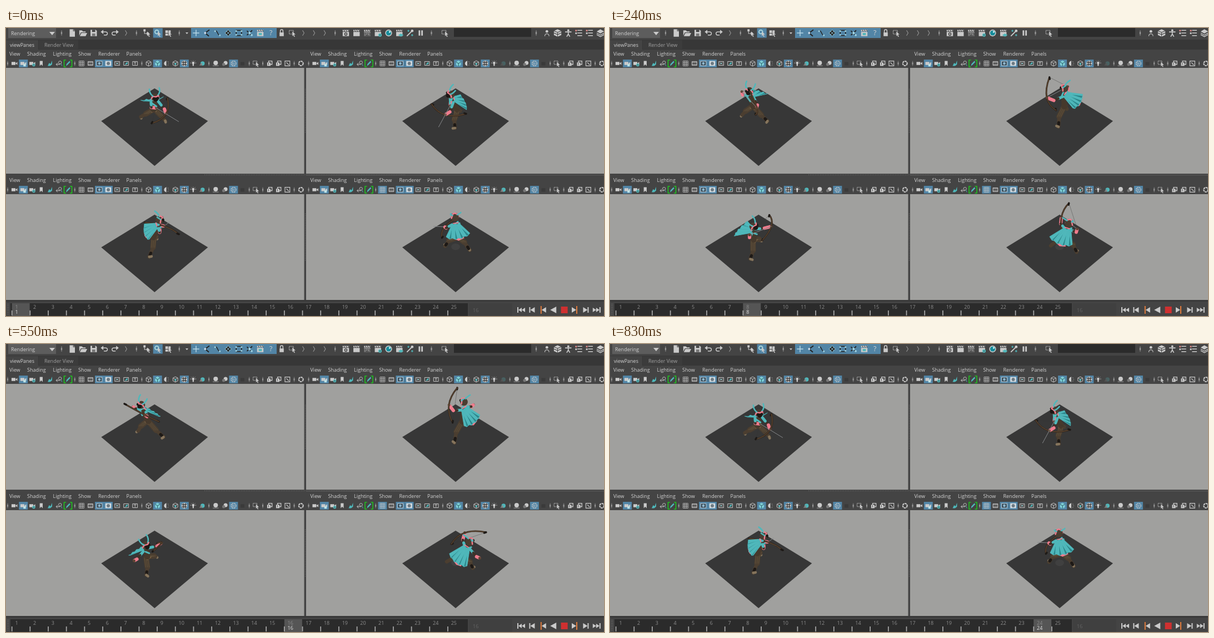
Animation of 1076x520 px, one loop 0.87 s. Source, as an HTML page with a canvas:

```html
<!DOCTYPE html>
<html lang="en">
<head>
<meta charset="utf-8">
<title>Archer viewports</title>
<style>
html, body { margin: 0; width: 100%; height: 100%; overflow: hidden; background: #444; }
svg, canvas { position: absolute; left: 0; top: 0; width: 1076px; height: 520px; display: block; }
text { font: 9px "Open Sans", "Noto Sans", sans-serif; fill: #d2d2d2; }
.dim { fill: #8c8c8c; }
</style>
</head>
<body>
<svg id="ui" viewBox="0 0 1076 520"></svg>
<canvas id="stage" width="1076" height="520"></canvas>
<script>
const LIGHT = '#cacaca', TEAL = '#4fb8bb', BLUE = '#5285a6', BAR = '#444', DARK = '#2b2b2b';

// ---------- interface ----------
const rect = (x, y, w, h, c, more = '') => `<rect x="${x}" y="${y}" width="${w}" height="${h}" fill="${c}" ${more}/>`;
const fill = (d, c = LIGHT) => `<path d="${d}" fill="${c}"/>`;
const line = (d, c = LIGHT, w = 1.1, more = '') => `<path d="${d}" fill="none" stroke="${c}" stroke-width="${w}" ${more}/>`;
const disc = (x, y, r, c = LIGHT) => `<circle cx="${x}" cy="${y}" r="${r}" fill="${c}"/>`;
const ring = (r, w, dash) => `<circle r="${r}" fill="none" stroke="${LIGHT}" stroke-width="${w}" stroke-dasharray="${dash}"/>`;
const label = (x, y, s, more = '') => `<text x="${x}" y="${y}" ${more}>${s}</text>`;
const at = (x, y, s, k = 1) => `<g transform="translate(${x} ${y}) scale(${k})">${s}</g>`;
const flip = s => `<g transform="scale(-1 1)">${s}</g>`;
const dots = d => line(d, '#777', 1, 'stroke-dasharray="1 2"');

const frame = line('M-5-4H5V4H-5Z');
const cam = fill('M-6-3H2V3H-6ZM2 0L6-3V3Z');
const cursor = fill('M0-3L6 3L3 3L5 7L3 7L2 4L0 6Z');
const clap = rect(-6, -2, 12, 8, LIGHT) + fill('M-6-6H6V-3H-6Z') + line('M-4-6L-2-3M0-6L2-3M4-6L6-3', BAR);
const box = line('M0-5.5L5-3V3L0 5.5L-5 3V-3ZM-5-3L0-.5L5-3M0-.5V5.5');
const undo = line('M-4-2H2C7-2 7 4 2 4H-1', LIGHT, 1.6) + fill('M-7-2L-2-6V2Z');
const list = line('M-3-5H6M-3 0H6M-3 5H6', LIGHT, 1.8) + rect(-7, -6, 3, 3, '#d88') + rect(-7, -1, 3, 3, LIGHT);

const icons = {
  sep: rect(-.8, -5, 1.6, 10, '#777') + rect(-1.2, -2, 2.4, 4, '#999'),
  cam, camLock: cam + fill('M0 1H5V6H0Z', '#bfe3e6'), camGear: cam + disc(3, 3, 3, TEAL) + disc(3, 3, 1, BAR),
  mark: fill('M-3-5H3V5L0 2L-3 5Z'),
  pan: fill('M-5 5L-2-1L1 1L4-6V2L0 5Z', TEAL),
  zoom: line('M-6 2H2M-3-1L-6 2L-3 5') + at(2, -2, ring(3, 1, 'none')) + line('M4 1L6 5', TEAL),
  pencil: line('M-4-7H-8V7H-4M4-7H8V7H4', '#18d818', 1.5) + fill('M-4 5L-3 1L3-5L5-3L-1 3Z', TEAL),
  grid: line('M-5-5H5V5H-5ZM-5-1.7H5M-5 1.7H5M-1.7-5V5M1.7-5V5', LIGHT, .9),
  film: frame + line('M-5-2H5M-5 2H5'),
  gate: rect(-6, -5, 12, 10, '#d5dde2') + rect(-5, -4, 10, 8, '#2d4250') + disc(0, 0, 2.8, '#8fb4c8'),
  mask: rect(-6, -5, 12, 10, '#d5dde2') + disc(0, 0, 3.4, '#6d7a82'),
  cross: frame + line('M-3-2L3 2M3-2L-3 2') + disc(0, 0, 1, TEAL),
  safe: frame + fill('M-3 3L0-1L3-3V1Z', TEAL),
  title: frame + line('M-2.5-2H2.5M0-2V3'),
  box, texBox: box + disc(0, 1, 2, TEAL),
  solidBox: fill('M0-6L5-3V3L0 6L-5 3V-3Z', '#7fd0d6') + line('M-5-3L0 0L5-3M0 0V6', '#24515e'),
  half: disc(0, 0, 5) + fill('M0-5A5 5 0 0 1 0 5Z', '#222') + line('M1-3H4M1 0H5M1 3H4', LIGHT, .8),
  check: disc(0, 0, 6) + line('M-5-2H5M-5 2H5M-2-5V5M2-5V5', '#333', 1.4),
  bulb: disc(0, -1, 2.6) + rect(-1.3, 1, 2.6, 4, LIGHT) + line('M-6-1H-4M4-1H6M0-6V-5M-4-5L-3-4M4-5L3-4'),
  orb: disc(1, 0, 4.2, TEAL) + fill('M-6 4L0-2V4Z', '#888'),
  ball: disc(0, -1, 4.6) + fill('M-6 4H6V5.5H-6Z', '#888'),
  blur: disc(2, -1, 4) + disc(-2, 2, 3, '#777'),
  smooth: ring(5, 1.4, '3 1') + line('M-2-3V3M1-2V3'),
  dimBox: rect(-4, -3, 8, 7, '#3a3a3a'),
  pick: line('M-6-5H2V2H-6Z', LIGHT, 1, 'stroke-dasharray="2 1"') + cursor,
  copy: line('M-2-5H5V2H-2Z', LIGHT, 1.5) + fill('M-5-2H2V5H-5Z') + line('M-2-1V3', BAR),
  shrink: line('M-5-5H5V5H-5ZM-2-2L3 3', LIGHT, 1.3), iris: ring(4.5, 2.4, '4 1'),
  next: line('M-1-5L2 0L-1 5', '#999'),
  file: fill('M-5-7H2L5-4V7H-5Z') + line('M2-7V-4H5', BAR),
  folder: fill('M-7-5H-2L0-3H5V-1H-4L-7 5ZM-3 0H8L5 6H-6Z'),
  save: fill('M-6-6H4L6-4V6H-6Z') + rect(-3, -6, 6, 4, BAR) + rect(-3, 1, 6, 5, '#777'),
  undo, redo: flip(undo),
  tree: fill('M-7-7H-3V-3H-7ZM-1-1H3V3H-1Z') + line('M-5-3V1H-1') + cursor,
  aim: rect(-9, -9, 18, 18, BLUE) + disc(-2, -2, 4.5, '#a8d5dc') + disc(-2, -2, 2.5, BLUE) + cursor,
  hit: fill('M-6-5H-1V0H-6ZM0-5H4V0H0ZM-6 1H-1V5H-6Z') + cursor,
  plus: line('M-6 0H6M0-6V6', '#b8d8e6', 1.5), bend: line('M5-6L-3 0L4 6', '#222', 2) + disc(-3, 0, 2, '#cde'),
  curve: line('M-6-4C2-6-2 4 6 5', '#222', 1.5) + rect(-6, -5, 3, 3, '#9ed2e2') + rect(3, 3, 3, 3, '#9ed2e2'),
  gem: fill('M0-6L6 0L0 6L-6 0Z', '#222') + line('M0-6L6 0L0 6L-6 0ZM-3-3L3 3M3-3L-3 3', '#9ed2e2', 1),
  lattice: line('M-5-5H5V5H-5Z', '#222', 1.6) + line('M-5-5V5M5-5V5', '#9ed2e2', 3, 'stroke-dasharray="3 4"'),
  links: line('M-5-4L4 5M5-5L-5 4', '#222', 1.8) + disc(0, 0, 2.4, '#9ed2e2') + disc(4, 4, 2, '#9ed2e2'),
  clap, clapTeal: clap + rect(-3, 0, 6, 4, TEAL), help: label(-2.8, 4.5, '?', 'style="font-size:13px"'),
  lock: rect(-4, -1, 8, 7, LIGHT) + line('M-2.5-1V-4A2.5 2.5 0 0 1 2.5-4V-1', LIGHT, 1.6),
  eye: clap + disc(0, 2, 3, BAR) + disc(0, 2, 1.4), gear: clap + disc(4, 4, 3.2, TEAL) + disc(4, 4, 1, BAR),
  ipr: clap + rect(-6, -1, 12, 7, BAR) + label(-5.5, 5.5, 'IPR', 'style="font-size:7px"'),
  lens: disc(0, 0, 6.5) + disc(0, 0, 4.8, '#168c9b') + disc(2, -2, 1.6, '#dff'),
  stack: clap + fill('M-2 4L3 1L8 4L3 7Z', TEAL),
  spark: line('M-6 6L3-3', LIGHT, 2) + line('M-5-4L-1-4M-3-6V-2M4 2V6M2 4H6', TEAL, 1.4) + disc(4, -4, 2.5),
  pause: rect(-4, -5, 3, 10, LIGHT) + rect(1, -5, 3, 10, LIGHT),
  user: disc(0, -3, 2.6) + line('M-4 6C-4 0 4 0 4 6'),
  cube: fill('M0-7L7-4V4L0 7L-7 4V-4Z') + line('M-7-4L0-1L7-4M0-1V7M-7 0L0 3L7 0', BAR),
  man: disc(0, -5, 2) + line('M-6-2H6M0-3V2L-3 7M0 2L3 7', LIGHT, 1.8),
  list, tiers: fill('M0-7L7-3L0 1L-7-3Z') + line('M-7 0L0 4L7 0M-7 3L0 7L7 3', LIGHT, 1.5)
};

const panelNames = ('sep cam camLock camGear mark pan zoom pencil sep grid film gate mask cross safe title sep ' +
  'box solidBox half texBox check bulb orb sep ball blur smooth dimBox sep pick sep copy copy shrink sep iris').split(' ');
const menus = { View: 6, Shading: 38, Lighting: 84.5, Show: 130, Renderer: 166, Panels: 216.5 };

function iconRow(active) {
  let x = 3;
  return panelNames.map((n, i) => {
    if (i) x += n === 'sep' || panelNames[i - 1] === 'sep' ? 12.2 : 16.05;
    return (active.includes(n) ? rect(x - 8, 57, 16, 14, BLUE) : '') + at(x, 64, icons[n], .88);
  }).join('');
}
function panel(i) {
  const active = ['camLock', 'gate', 'mask', 'solidBox', 'check', 'smooth'].concat(i === 3 ? 'grid' : []);
  const left = i % 2 ? -1.5 : 0;
  return at(i % 2 * 541.5, i > 1 ? 228 : 0,
    rect(left, 72, 536.5, 191, '#a0a09e') + iconRow(active) +
    Object.entries(menus).map(([s, x]) => label(x, 50, s)).join('') +
    (i === 1 ? rect(346, 58, 15, 12, BAR, 'opacity=".75"') : ''));
}
const toolbar = (x, names) => names.split(' ').map((n, i) => at(x + 19.25 * i, 9, icons[n], .95)).join('');

const slot = n => 10.6 + 32.68 * (n - 1);
const numbers = Array.from({ length: 25 }, (_, i) => i + 1);
const first = fill('M-7-5H-5V5H-7ZM-5 0L1-4V4ZM1 0L7-4V4Z'), prev = fill('M-5-5H-3V5H-5ZM-3 0L5-5V5Z');
const keyBack = rect(-4, -7, 2, 14, '#df7b3c') + fill('M-2 0L6-5V5Z'), play = fill('M-6 0L5-6V6Z');
const controls = [first, prev, keyBack, play, rect(-6, -6, 12, 12, '#cf3030'), flip(keyBack), flip(prev), flip(first)];

document.getElementById('ui').innerHTML =
  rect(0, 0, 1076, 520, BAR) + rect(4, 0, 86, 18, '#5d5d5d') + label(9, 13, 'Rendering') + fill('M78 7H88L83 13Z') +
  rect(333, 0, 154, 18, BLUE) + rect(806, 0, 139, 16, DARK) + fill('M323 8H328L325.5 11Z') +
  toolbar(100, 'sep file folder save undo redo next sep tree aim hit sep') +
  toolbar(342, 'plus bend curve gem lattice links clapTeal help lock pick next next next sep eye clap ipr gear lens stack spark pause sep') +
  toolbar(790, 'pick') + toolbar(954, 'sep user cube man list list tiers') +
  rect(0, 21, 1076, 18, '#373737') + rect(0, 22, 58, 17, BAR) + rect(59, 22, 71, 16, '#3c3c3c') +
  label(7, 34, 'viewPanes') + label(69, 34, 'Render View', 'style="fill:#a0a0a0"') +
  [0, 1, 2, 3].map(panel).join('') +
  rect(540, 265, 536, 1, '#5a5a5a') + dots('M357 265H719M538.5 110V190M538.5 335V420') +
  rect(0, 491, 1076, 3, '#393939') + rect(8, 497, 823, 23, DARK) + dots('M2.5 498V518M4.5 498V518') +
  rect(0, 497, 32, 23, '#555', 'id="mark"') +
  numbers.map(n => label(slot(n) + 5.8, 507, n, 'class="dim"') + rect(slot(n) - .8, 510, 1.7, 9, '#aaa')).join('') +
  label(0, 516, '', 'id="now" style="fill:#e2e2e2"') +
  rect(833, 497, 78, 23, '#404040') + label(840, 513, '16', 'style="fill:#626262"') +
  controls.map((c, i) => at(927 + 19.4 * i, 509, c)).join('');

// ---------- key poses: points are [across, height, depth] on the floor ----------
const ready = { at: 0, count: 1, hip: [-2, 25, -2], head: [1, 62, 8], grip: [19, 34, 17], nock: [3, 40, 9],
  axis: [.42, .05, -.9], hem: [-5, 38, -17], stride: [0] };
const raise = { at: 3, count: 3, hip: [-1, 27, -4], head: [-1, 64, 5], grip: [14, 54, 20], nock: [4, 54, 8],
  axis: [-.77, .36, .5], hem: [-16, 40, -22], stride: [0] };
const draw = { at: 7, count: 8, hip: [-9, 26, -8], head: [-15, 62, -8], grip: [-3, 52, 21], nock: [-28, 56, -14],
  axis: [-.15, .95, .15], hem: [0, 42, -34], stride: [1] };
const loose = { at: 16, count: 16, hip: [-11, 26, -12], head: [-22, 62, -14], grip: [-15, 61, 11], nock: [-38, 44, -32],
  axis: [-.85, .48, -.12], hem: [-1, 33, -31], stride: [1] };
const recover = { at: 20, count: 22, hip: [-4, 23, -5], head: [-7, 57, 6], grip: [9, 29, 20], nock: [0, 35, 9],
  axis: [.98, -.09, -.13], hem: [-3, 35, -21], stride: [1] };
const poses = [ready, raise, draw, { ...draw, at: 11, count: 12 }, loose, recover, { ...ready, at: 24, count: 24 }];

// ---------- vectors and camera ----------
const mix = (a, b, u) => a.map((n, i) => n + (b[i] - n) * u);
const add = (a, b, k = 1) => a.map((n, i) => n + b[i] * k);
const unit = a => a.map(n => n / (Math.hypot(...a) || 1));
const lift = (a, h) => add(a, [0, h, 0]);

// Four cameras circle the floor at 45 degrees, with a mild perspective.
function camera(x0, y0, turn) {
  const c = Math.cos(turn), s = Math.sin(turn);
  return ([x, h, z]) => {
    const across = c * x + s * z, depth = c * z - s * x, near = .703 * depth + .711 * h;
    const k = 1 / (1 - .00233 * near);
    return { x: x0 + k * across, y: y0 + k * (.711 * depth - .703 * h), near, k };
  };
}
const cameras = [0, -1, 1, 2].map((q, i) => camera(i % 2 ? 809 : 267.3, i > 1 ? 396 : 168, q * Math.PI / 2));

// ---------- drawing ----------
const ctx = document.getElementById('stage').getContext('2d');
ctx.lineJoin = ctx.lineCap = 'round';
const BROWN = '#4b3e30', PINK = '#f07c8d', BLACK = '#1d1916', HOOD = '#4a3d31';

function archer(p, see, step) {
  const parts = [];
  const part = (pts, bias, paint) => {
    const seen = pts.map(see);
    const near = seen.reduce((sum, q) => sum + q.near, 0) / seen.length;
    parts.push({ near: near + bias, paint: () => paint(seen) });
  };
  const trace = (seen, shift = 0) => {
    ctx.beginPath();
    seen.forEach(q => ctx.lineTo(q.x + shift, q.y));
  };
  const ink = (c, w) => { ctx.strokeStyle = c; ctx.lineWidth = w; ctx.stroke(); };
  const tube = (c, w, pts, bias = 0) => part(pts, bias, s => { trace(s); ink(c, w); });
  const patch = (c, pts, bias = 0) => part(pts, bias, s => { trace(s); ctx.closePath(); ctx.fillStyle = c; ctx.fill(); });
  const blob = (c, r, at, bias = 0) => part([at], bias, ([q]) => {
    ctx.beginPath(); ctx.arc(q.x, q.y, r * q.k, 0, 7); ctx.fillStyle = c; ctx.fill();
  });

  const { hip, head, grip, nock, hem } = p, neck = mix(hip, head, .7);
  const back = unit([hem[0] - neck[0], 0, hem[2] - neck[2]]), side = [back[2], 0, -back[0]];
  const out = (a, across, behind = 0) => add(add(a, side, across), back, behind);
  const stride = p.stride[0];

  // legs
  const feet = [[-25 - 5 * stride, 2, -9 - 5 * stride], [19 - 3 * stride, 2, 1 + stride]];
  feet.forEach((foot, i) => {
    const top = out(hip, i ? -3 : 3), knee = lift(out(mix(top, foot, .55), 0, -3), 3), shin = mix(knee, foot, .6);
    tube(BROWN, 6.5, [knee, foot], -2);
    part([top, knee], -1, s => {
      trace(s); ink(BROWN, 10);
      for (const o of [-3, 0, 3]) { trace(s, o); ink('#66573f', .8); }
    });
    tube(BLACK, 5.2, [shin, mix(shin, foot, .5)]);
    tube('#85745c', 4.6, [foot, out(foot, 0, -4)], 2);
  });

  // body and arms
  tube('#46392c', 10, [lift(hip, 1), lift(neck, -4)]);
  tube('#7a6145', 2, [out(hip, 4, -4), out(hip, -4, -4)], 1);
  tube(TEAL, 3, [out(neck, 5, -4), out(lift(neck, -7), -2, -5)], 2);
  [[nock, 1], [grip, -1]].forEach(([hand, s]) => {
    const shoulder = out(lift(neck, -1), 6 * s), elbow = lift(out(mix(shoulder, hand, .5), 4 * s), -4);
    tube(TEAL, 5, [shoulder, mix(shoulder, elbow, .5)]);
    tube('#3f3228', 4.5, [mix(shoulder, elbow, .5), elbow]);
    tube(PINK, 6, [elbow, mix(elbow, hand, .8)], 1);
    tube('#c95f74', 1.2, [lift(elbow, -2), lift(mix(elbow, hand, .8), -2)], 2);
    blob('#5b4433', 2.2, hand, 2);
  });

  // cape: fluted strips from the shoulders to a scalloped hem
  const folds = 8;
  const edge = i => {
    const u = i / folds * 2 - 1;
    return [out(neck, 7 * u, 2), lift(out(hem, 20 * u, -4 * u * u), 3 * u * u + (i % 2 ? -2 : 1))];
  };
  patch(PINK, [...edge(3), lift(edge(4)[1], -6), lift(edge(6)[1], -4)], -1);
  part([neck, hem], 2, () => {
    for (let i = 0; i < folds; i++) {
      const [a, b] = edge(i), [c, d] = edge(i + 1);
      trace([a, b, d, c].map(see));
      ctx.closePath(); ctx.fillStyle = TEAL; ctx.fill(); ink(TEAL, .8);
      if (i % 2) {
        trace([mix(a, b, .35), mix(a, b, .96), mix(b, d, .55)].map(see));
        ctx.fillStyle = '#2c868b'; ctx.fill();
      }
    }
  });

  // head
  blob(HOOD, 6.4, head);
  blob(BLACK, 3.6, lift(out(head, 0, -4), -1), 1);
  for (const s of [1, -1]) {
    const root = lift(out(head, 4 * s, -1), 4);
    blob(BLACK, 2.1, lift(out(head, 3 * s, -5), 2), 1);
    tube(PINK, 2.4, [root, lift(out(head, 6 * s, 0), -1)]);
    part([root, lift(out(head, 9 * s, 1), 8), lift(out(head, 8 * s, 6), 13)], 1, ([a, b, c]) => {
      ctx.beginPath(); ctx.moveTo(a.x, a.y); ctx.quadraticCurveTo(b.x, b.y, c.x, c.y); ink(TEAL, 2.6);
    });
  }
  tube(PINK, 2.4, [lift(out(head, 5, -2), 4), lift(out(head, 0, -5), 5), lift(out(head, -5, -2), 4)], 1);
  tube(PINK, 2, [out(lift(neck, 3), 4, 2), out(lift(neck, 3), -4, 2)], 2);

  // bow and arrow
  const aim = unit(add(grip, nock, -1)), axis = unit(p.axis), chord = add(grip, aim, -12);
  const tips = [add(chord, axis, 32), add(chord, axis, -32)], armed = step < 13 || step > 21;
  tube('#33333388', .7, armed ? [tips[0], nock, tips[1]] : tips);
  part([tips[0], add(grip, aim, 12), tips[1]], 3, ([a, b, c]) => {
    ctx.beginPath(); ctx.moveTo(a.x, a.y); ctx.quadraticCurveTo(b.x, b.y, c.x, c.y);
    ink('#33261c', 2.8); ink('#73573b', .9);
  });
  tips.forEach(t => tube(BLACK, 3.4, [t, mix(t, chord, .1)], 2));
  if (armed) tube('#85878a', 1, [nock, add(nock, aim, 43)], 3);

  parts.sort((a, b) => a.near - b.near).forEach(q => q.paint());
}

function floor(see) {
  ctx.beginPath();
  for (let i = 0; i < 4; i++) {
    const q = see([96 * Math.cos(i * Math.PI / 2), 0, 96 * Math.sin(i * Math.PI / 2)]);
    ctx.lineTo(q.x, q.y);
  }
  ctx.fillStyle = '#373737';
  ctx.fill();
}

// ---------- playback ----------
const mark = document.getElementById('mark'), now = document.getElementById('now');
let shown = -1;

function render(step) {
  const k = Math.max(0, poses.findIndex(p => p.at >= step) - 1), a = poses[k], b = poses[k + 1];
  const u = (step - a.at) / (b.at - a.at), p = {};
  for (const part in a) if (Array.isArray(a[part])) p[part] = mix(a[part], b[part], u);
  const count = Math.round(a.count + (b.count - a.count) * u);
  mark.setAttribute('x', slot(count));
  now.setAttribute('x', slot(count) + 5.8);
  now.textContent = count;
  ctx.clearRect(0, 0, 1076, 520);
  cameras.forEach((see, i) => {
    floor(see);
    if (i === 3) {
      ctx.beginPath(); ctx.ellipse(809, 395, 8, 6, 0, 0, 7); ctx.fillStyle = '#404040'; ctx.fill();
    }
    archer(p, see, step);
  });
}
function tick() {
  const t = performance.now() % 870, step = Math.min(24, Math.floor((t + 7) / 34.8));
  if (step !== shown) render(shown = step);
  requestAnimationFrame(tick);
}
tick();
</script>
</body>
</html>
```
